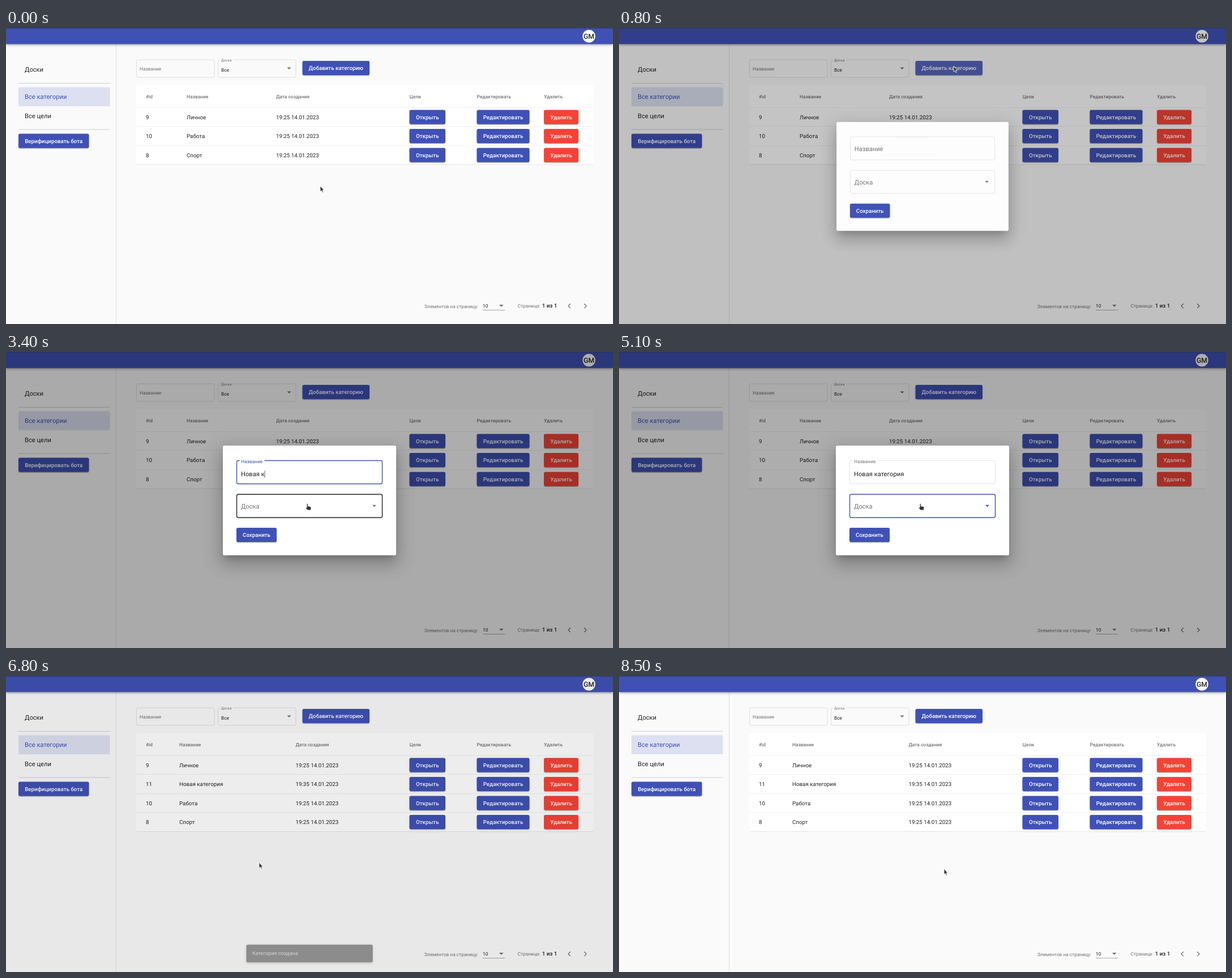
Animation of 1072x522 px, one loop 9500 ms. Source, as an HTML page:

```html
<!DOCTYPE html>
<html lang="ru">
<head>
<meta charset="utf-8">
<title>Категории</title>
<style>
  html, body { margin: 0; width: 100%; height: 100%; overflow: hidden; background: #fafafa; }
  svg { display: block; width: 1072px; height: 522px; }
  text { font-family: Roboto, "Noto Sans", sans-serif; fill: rgba(0,0,0,.87); text-rendering: geometricPrecision; white-space: pre; }
  .s { font-size: 8.38px; }
  .m { font-size: 9.77px; }
  .l { font-size: 11.17px; }
  .b { font-weight: 500; }
  .mid { text-anchor: middle; }
  .grey { fill: rgba(0,0,0,.55); }
  .white { fill: #fff; }
  .blue { fill: #3f51b5; }
  .outline { fill: none; stroke: rgba(0,0,0,.14); stroke-width: .8; }
  .hover { stroke: rgba(0,0,0,.87); stroke-width: 1.4; }
  .focus { stroke: #3f51b5; stroke-width: 1.4; }
  #dialog { transform-origin: 536px 262px; }
  #snack { transform-origin: 536px 489px; }
  #cursor path { fill: #333; stroke: #fff; stroke-width: .8; stroke-linejoin: round; }
</style>
</head>
<body>
<svg id="stage" viewBox="0 0 1072 522"></svg>
<script>
const LOOP = 9500, STEP = 100;
const BLUE = '#3f51b5', RED = '#f44336', LINE = 'rgba(0,0,0,.13)';

// Markup helpers
const rect = (x, y, w, h, fill, r = 0, extra = '') =>
  `<rect x="${x}" y="${y}" width="${w}" height="${h}" rx="${r}" fill="${fill}" ${extra}/>`;
const text = (x, y, str, cls, extra = '') => `<text x="${x}" y="${y}" class="${cls}" ${extra}>${str}</text>`;
const group = (id, body) => `<g id="${id}">${body}</g>`;
const tri = (x, y, w, cls = 'grey', id = '') =>
  `<path ${id && `id="${id}"`} class="${cls}" d="M${x - w / 2} ${y}h${w}l${-w / 2} ${w / 2}z"/>`;

// Each layer: offset, blur, spread, opacity
const shadow = (x, y, w, h, layers) => layers.map(([dy, blur, spread, a]) =>
  rect(x - spread, y - spread + dy, w + 2 * spread, h + 2 * spread, `rgba(0,0,0,${a})`, 2,
    `style="filter:blur(${blur / 2}px)"`)).join('');
const LOW = [[2.1, .7, -1.4, .2], [1.4, 1.4, 0, .14], [.7, 3.5, 0, .12]];
const MENU = [[1.4, 2.8, -.7, .2], [2.8, 3.5, 0, .14], [.7, 7, 0, .12]];
const HIGH = [[7.7, 10.5, -4.9, .2], [16.8, 26.5, 2.1, .14], [6.3, 32, 5.6, .12]];

const button = (x, y, w, label, fill = BLUE, over = '') =>
  shadow(x, y, w, 25, LOW) + rect(x, y, w, 25, fill, 2.8) + over +
  text(x + w / 2, y + 16, label, 'm b white mid');

const ripple = (id, x, y, w, cx, cy) =>
  `<clipPath id="${id}Clip">${rect(x, y, w, 25, '#000', 2.8)}</clipPath>
   <g clip-path="url(#${id}Clip)"><circle id="${id}" cx="${cx}" cy="${cy}" r="0" fill="#fff"/></g>`;

// Rounded outline with an opening in its top edge for a floating label
const outlinePath = (x, y, w, h, gap) => {
  const r = 3;
  const head = gap ? `M${x + 6 + gap} ${y}` : `M${x + 5} ${y}`;
  return `${head}H${x + w - r}q${r} 0 ${r} ${r}V${y + h - r}q0 ${r} ${-r} ${r}H${x + r}` +
    `q${-r} 0 ${-r} ${-r}V${y + r}q0 ${-r} ${r} ${-r}H${x + 5}`;
};
const outline = (x, y, w, h, gap = 0, id = '') =>
  `<path ${id && `id="${id}"`} class="outline" d="${outlinePath(x, y, w, h, gap)}"/>`;

const row = (i, id, name, time, nameX, dateX) => {
  const y = 140.5 + i * 33.5;
  return rect(230, y, 807, 33.5, '#fff') + rect(230, y + 33, 807, .8, LINE) +
    text(247, y + 20, id, 'm') + text(nameX, y + 20, name, 'm') + text(dateX, y + 20, `${time} 14.01.2023`, 'm') +
    button(712.5, y + 4, 63.5, 'Открыть') + button(831.5, y + 4, 93, 'Редактировать') +
    button(950, y + 4, 61, 'Удалить', RED);
};
const table = (id, nameX, dateX, rows) => group(id,
  rect(230, 101, 807, 39.5, '#fff') + rect(230, 140, 807, .8, LINE) +
  [[247, '#id'], [nameX, 'Название'], [dateX, 'Дата создания'], [712.5, 'Цели'],
   [831.5, 'Редактировать'], [950, 'Удалить']].map(([x, s]) => text(x, 123.6, s, 's b grey')).join('') +
  rows.map((r, i) => row(i, ...r, nameX, dateX)).join(''));

const sidebar =
  rect(194.3, 28, .8, 494, LINE) +
  text(33, 77, 'Доски', 'l') + rect(22, 97, 161.5, .8, 'rgba(0,0,0,.22)') +
  rect(22, 104.5, 161.5, 33.5, '#dce0f0', 1.5) + text(33, 125, 'Все категории', 'l blue') +
  text(33, 158.7, 'Все цели', 'l') + rect(22, 178.6, 161.5, .8, 'rgba(0,0,0,.22)') +
  button(22, 186.5, 124.5, 'Верифицировать бота');

const toolbar = shadow(0, 0, 1072, 28, [[1.4, 2.8, -.7, .2], [2.8, 3.5, 0, .14], [.7, 7, 0, .12]]) +
  rect(0, 0, 1072, 28.3, BLUE) +
  '<circle cx="1029.5" cy="14.5" r="11.2" fill="#fff"/>' +
  text(1029.5, 18.6, 'GM', 'b mid', 'font-size="12.2"');

const filters =
  outline(230.4, 56, 137.6, 31) + text(236, 74.5, 'Название', 's grey') +
  outline(374.4, 56, 137.6, 31, 20) + text(380, 59.3, 'Доска', 'grey', 'font-size="6.28"') +
  text(380, 76.6, 'Все', 's') + tri(500, 69.5, 7) +
  button(523.5, 58, 118.5, 'Добавить категорию', BLUE, ripple('addRipple', 523.5, 58, 118.5, 591, 67));

const chevron = (x, d) =>
  `<path d="M${x - d * 1.8} 486.3l${d * 3.8} 3.9l${-d * 3.8} 3.9" fill="none" stroke="rgba(0,0,0,.56)" stroke-width="1.3"/>`;
const pager =
  text(738.5, 494.2, 'Элементов на страницу:', 's grey') + text(842, 492.8, '10', 's') +
  tri(874.8, 488, 7.4) + rect(842, 497, 39, .8, 'rgba(0,0,0,.42)') +
  text(903.5, 492.8, 'Страница:', 's grey') + text(946.7, 493.3, '1 из 1', 'm b') +
  chevron(995, -1) + chevron(1023, 1);

const dialog =
  shadow(383, 165, 306, 193.5, HIGH) + rect(383, 165, 306, 193.5, '#fff', 2.8) +
  outline(407.5, 191.5, 257, 41, 0, 'nameBox') + text(0, 0, 'Название', 'l grey', 'id="nameLabel"') +
  text(415, 219, '', 'l', 'id="typed"') + rect(0, 209, .8, 13, BLUE, 0, 'id="caret"') +
  outline(407.5, 251, 257, 41, 0, 'boardBox') + text(0, 0, 'Доска', 'l grey', 'id="boardLabel"') +
  text(415, 278, 'Доска №1', 'l', 'id="board"') + tri(650.5, 269.7, 7, 'grey', 'boardArrow') +
  button(407, 310, 71, 'Сохранить', BLUE, ripple('saveRipple', 407, 310, 71, 447, 329)) +
  group('panel', shadow(404, 254.5, 265, 33.5, MENU) + rect(404, 254.5, 265, 33.5, '#fff', 2.8) +
    rect(404, 254.5, 265, 33.5, 'rgba(0,0,0,.04)', 2.8) + text(415, 275.3, 'Доска №1', 'l'));

const snack = shadow(416, 472.5, 240, 33.5, MENU) + rect(416, 472.5, 240, 33.5, '#323232', 2.8) +
  `<text x="427" y="492.6" class="m" style="fill:rgba(255,255,255,.7)">Категория создана</text>`;

const cursor =
  `<path id="arrow" d="M0 0V10.2L2.3 8.1L3.9 11.7L5.5 11L4 7.5H6.6z"/>
   <path id="hand" d="M-1.9 1q0-1.2 1.1-1.2t1.1 1.2v3.2l4.2 1q1.6.4 1.4 2l-.8 4.3h-5.6l-3.2-3.9q-.5-1.2.7-1.3l1.1.7z"/>`;

document.getElementById('stage').innerHTML =
  rect(0, 0, 1072, 522, '#fafafa') + sidebar + filters +
  table('before', 319, 477, [['9', 'Личное', '19:25'], ['10', 'Работа', '19:25'], ['8', 'Спорт', '19:25']]) +
  table('after', 306, 511.5, [['9', 'Личное', '19:25'], ['11', 'Новая категория', '19:35'],
    ['10', 'Работа', '19:25'], ['8', 'Спорт', '19:25']]) +
  pager + toolbar + rect(0, 0, 1072, 522, '#000', 0, 'id="shade"') +
  rect(0, 0, 1072, .9, 'rgba(40,45,70,.6)') +
  group('dialog', dialog) + group('snack', snack) + group('cursor', cursor);

const $ = id => document.getElementById(id);
const set = (id, name, value) => $(id).setAttribute(name, value);
const show = (id, on) => { $(id).style.display = on ? '' : 'none'; };

// Keys are [time, value]: at() interpolates, last() holds
const at = (t, keys) => {
  const i = keys.findIndex(k => k[0] > t);
  if (i < 0) return keys[keys.length - 1][1];
  if (!i) return keys[0][1];
  const [t0, a] = keys[i - 1], [t1, b] = keys[i];
  return a + (b - a) * (t - t0) / (t1 - t0);
};
const last = (t, keys) => keys.reduce((v, k) => k[0] <= t ? k[1] : v, 0);

const CURSOR_X = [[0, 555], [500, 591], [1200, 591], [1900, 533], [6000, 533], [6500, 447], [7100, 447], [7300, 573], [8400, 573], [8500, 574]];
const CURSOR_Y = [[0, 278.5], [500, 67], [1200, 67], [1900, 267.5], [6000, 267.5], [6500, 328.5], [7100, 329], [7300, 340]];
const TYPED = [[2000, 1], [2100, 2], [2200, 4], [2400, 5], [3000, 4], [3100, 5], [3200, 6], [3400, 7],
  [3500, 8], [3600, 9], [3800, 10], [4200, 11], [4300, 12], [4400, 13], [4600, 15]];
const SHADE = [[600, 0], [700, .06], [800, .23], [900, .3], [1100, .32], [6700, .32], [6800, .07], [6900, 0]];

function placeField(prefix, y, gap, float, state) {
  set(prefix + 'Box', 'd', outlinePath(407.5, y, 257, 41, float * gap));
  set(prefix + 'Box', 'class', `outline ${state}`);
  set(prefix + 'Label', 'class', `l ${state === 'focus' ? 'blue' : 'grey'}`);
  set(prefix + 'Label', 'transform', `translate(415 ${y + 24.7 - 20.2 * float}) scale(${1 - .25 * float})`);
}

function render(t) {
  const open = t >= 700 && t < 6800;
  const saved = t >= 6800;
  show('before', !saved);
  show('after', saved);
  set('shade', 'opacity', at(t, SHADE));

  show('dialog', open);
  $('dialog').style.opacity = at(t, [[700, .5], [800, .98], [900, 1]]);
  $('dialog').style.transform = `scale(${at(t, [[700, .85], [800, .993], [900, 1]])})`;

  const nameFocus = t >= 900 && t < 5100;
  const boardFocus = t >= 5100 && t < 6600;
  const overBoard = t >= 1900 && t < 5100;
  const boardFloat = at(t, [[5100, 0], [5200, .6], [5300, 1]]);
  placeField('name', 191.5, 43, at(t, [[800, 0], [900, .4], [1000, .9], [1100, 1]]), nameFocus ? 'focus' : '');
  placeField('board', 251, 30, boardFloat, boardFocus ? 'focus' : overBoard ? 'hover' : '');
  if (boardFocus && !boardFloat) set('boardLabel', 'class', 'l grey');
  set('boardArrow', 'class', boardFocus ? 'blue' : 'grey');
  show('board', t >= 5700);
  show('panel', t >= 5200 && t < 5900);
  set('panel', 'opacity', at(t, [[5200, .6], [5300, 1], [5700, 1], [5800, .3]]));

  $('typed').textContent = 'Новая категория'.slice(0, last(t, TYPED));
  show('caret', t >= 1100 && t < 4600);
  if (open) set('caret', 'x', 415 + $('typed').getComputedTextLength());

  set('addRipple', 'r', at(t, [[500, 0], [600, 35], [700, 85]]));
  set('addRipple', 'opacity', at(t, [[800, .12], [1000, 0]]));
  set('saveRipple', 'r', at(t, [[6500, 0], [6600, 16], [6700, 35]]));
  set('saveRipple', 'opacity', .1);

  show('snack', t >= 6800 && t < 8200);
  $('snack').style.opacity = at(t, [[6800, .5], [6900, 1]]);
  $('snack').style.transform = `scale(${at(t, [[6800, .93], [6900, 1]])})`;

  const hand = (t >= 500 && t < 700) || (t >= 1900 && t < 6100) || (t >= 6500 && t < 6800);
  show('hand', hand);
  show('arrow', !hand);
  set('cursor', 'transform', `translate(${at(t, CURSOR_X)} ${at(t, CURSOR_Y)})`);
}

const start = performance.now();
function tick() {
  const t = (performance.now() - start) % LOOP;
  render(Math.floor(t / STEP) * STEP);
  requestAnimationFrame(tick);
}
tick();
</script>
</body>
</html>
```
